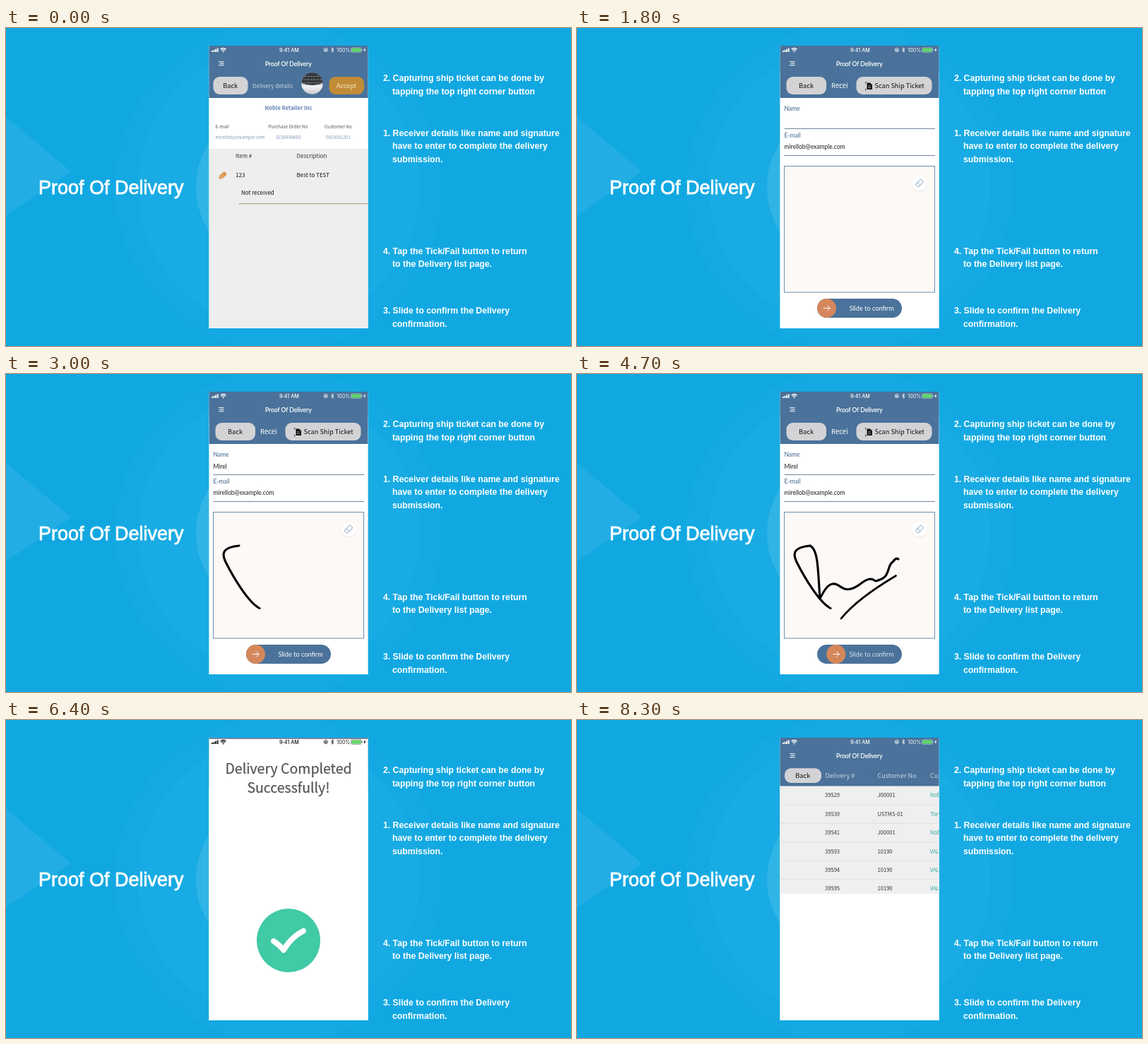
Write an HTML page that moves like this. It is 800 by 450 pixels and loops after 8.6 s.

```html
<!DOCTYPE html>
<html lang="en">
<head>
<meta charset="utf-8">
<title>Proof Of Delivery</title>
<style>
html, body { margin: 0; width: 100%; height: 100%; overflow: hidden; background: #11a8e2; }
svg { display: block; width: 100vw; height: 100vh; }
text { white-space: pre; }
.big { font: 27px "Liberation Sans", Arial, sans-serif; fill: #fff; stroke: #fff; stroke-width: .8; }
.note { font: bold 12.25px "Liberation Sans", Arial, sans-serif; fill: #fff; }
.s { font-family: "Noto Sans CJK JP", "Noto Sans CJK SC", "Noto Sans CJK", "Noto Sans", sans-serif; font-size: 8px; fill: #333; }
.l { font-family: Lato, sans-serif; font-size: 8.5px; fill: #1c1c1c; }
.btn { font-size: 9.2px; font-weight: 500; fill: #111; }
.lab { font-size: 6.4px; fill: #555; }
.val { font-size: 6.3px; fill: #7f93b8; }
.row { font-size: 7.6px; }
.sub { font-size: 9.1px; fill: #c9d5e2; }
.name { fill: #2fa9a4; }
.blue { fill: #4a729a; }
.title { fill: #fff; font-weight: 500; stroke: #fff; stroke-width: .15; text-anchor: middle; }
.mid { text-anchor: middle; }
.line { fill: none; stroke: #73859a; stroke-width: 1; }
.ink { fill: none; stroke: #000; stroke-linecap: round; stroke-linejoin: round; }
.done { font-size: 19.5px; font-weight: 500; fill: #555; stroke: #555; stroke-width: .25; text-anchor: middle; }
</style>
</head>
<body>
<svg viewBox="0 0 800 450" preserveAspectRatio="none">
  <defs>
    <clipPath id="screen"><rect x="287.5" y="25" width="225" height="400"/></clipPath>
    <clipPath id="ball"><circle cx="433.5" cy="78.5" r="15.2"/></clipPath>
    <linearGradient id="silver" x2="0" y2="1">
      <stop offset=".3" stop-color="#b9bcc0"/><stop offset=".65" stop-color="#f1f2f3"/><stop offset="1" stop-color="#c5c9ce"/>
    </linearGradient>
  </defs>

  <rect width="800" height="450" fill="#11a8e2"/>
  <g fill="#fff">
    <path d="M0 126 92 203 0 265Z" opacity=".07"/>
    <circle cx="386" cy="225" r="232" opacity=".012"/>
    <circle cx="386" cy="225" r="200" opacity=".018"/>
    <circle cx="386" cy="225" r="117" opacity=".1"/>
  </g>
  <text class="big" x="46" y="234.5">Proof Of Delivery</text>
  <g id="notes"></g>

  <g clip-path="url(#screen)">
    <rect x="287" y="25" width="226" height="400" fill="#fff"/>

    <g id="details">
      <rect x="287" y="99" width="226" height="72" fill="#fff"/>
      <rect x="287" y="171" width="226" height="254" fill="#eee"/>
      <rect class="blue" x="287" y="60" width="226" height="39"/>
      <rect x="293.5" y="69" width="49" height="25" rx="9" fill="#d3d3d6"/>
      <text class="s btn mid" x="317.7" y="85">Back</text>
      <text class="s" x="349" y="84.7" style="fill:#c9d5e2">Delivery details</text>
      <g clip-path="url(#ball)">
        <rect x="418" y="63" width="31" height="31" fill="url(#silver)"/>
        <path d="M418 63h31v15q-15 6-31 0Z" fill="#34363a"/>
        <path d="M418 68.5h31M418 73h31M418 77.5h31" stroke="#8b9097" stroke-width="1" stroke-dasharray="3 1.4"/>
      </g>
      <rect id="accept" x="457.5" y="69" width="49.5" height="25" rx="9" fill="#c28b37"/>
      <text class="s btn mid" x="482" y="85" style="fill:#f6e5c6">Accept</text>
      <text class="s mid" x="400" y="116" style="font-size:7.7px;font-weight:700;fill:#6486b8">Noble Retailer Inc</text>
      <g class="s">
        <text class="lab" x="296.5" y="141.7">E-mail</text>
        <text class="lab" x="371.5" y="141.7">Purchase Order No</text>
        <text class="lab" x="451" y="141.7">Customer No</text>
        <text class="val" x="296.5" y="157">mirellob@example.com</text>
        <text class="val" x="382" y="157">SCSAFAWSG</text>
        <text class="val" x="453" y="157">0010001201</text>
      </g>
      <g id="items" class="s">
        <text x="325" y="183.8">Item #</text>
        <text x="411.5" y="183.8">Description</text>
        <text x="325" y="210.8" fill="#111">123</text>
        <text x="411.5" y="210.8" fill="#111">Best to TEST</text>
        <text x="333" y="235.5" fill="#111">Not received</text>
        <path d="M330 248.7H513" stroke="#8f6f52" stroke-width="1" stroke-dasharray="1.5 .7"/>
        <g transform="translate(306.5 209) rotate(-42)" fill="#f4c48d" stroke="#cf7a2b" stroke-width="1">
          <path d="M-6 0-3-2.3H5.5V2.3H-3Z"/><path d="M-3 0H5M3-2.3V2.3" fill="none"/>
        </g>
      </g>
      <g id="received">
        <text class="s" x="378" y="183.8">Delivered</text>
        <path class="line" d="M351 207.5H513"/>
      </g>
    </g>

    <g id="form">
      <rect x="287.5" y="99" width="225" height="326" fill="#fff"/>
      <rect class="blue" x="287.5" y="60" width="225" height="39"/>
      <rect x="296.5" y="69" width="56.5" height="25" rx="9" fill="#d3d3d6"/>
      <text class="s btn mid" x="324.5" y="85">Back</text>
      <text class="s" x="360" y="85" style="font-size:9.5px;fill:#fff">Recei</text>
      <rect x="395.5" y="69" width="107" height="25" rx="9" fill="#d3d3d6"/>
      <path d="M410.5 77.5h4.5l3 3v6.5h-7.5Z" fill="#111"/>
      <path d="M412 82h4M412 84.5h4" stroke="#d3d3d6" stroke-width=".7"/>
      <path d="M408.5 79v-2.5h1.5M408.5 85.5v2.5h1.5" fill="none" stroke="#111" stroke-width=".6"/>
      <text class="s btn" x="421.5" y="85.2">Scan Ship Ticket</text>
      <text class="l" x="293.5" y="117" style="fill:#41658c">Name</text>
      <text class="l" id="typed" x="293.5" y="133.5"></text>
      <path class="line" d="M293.5 142.5H507M293.5 180.5H507"/>
      <text class="l" x="293.5" y="154.5" style="fill:#41658c">E-mail</text>
      <text class="l" x="293.5" y="171">mirellob@example.com</text>
      <rect x="293.5" y="195.5" width="213" height="178.5" fill="#fdf9f7" stroke="#6d8fae"/>
      <circle cx="485" cy="220.3" r="11.2" fill="#e9e6e5"/>
      <circle cx="485" cy="219.7" r="10.8" fill="#fff"/>
      <g transform="translate(485 219.5) rotate(-45)" fill="none" stroke="#6d93b5" stroke-width=".9">
        <rect x="-5.5" y="-2.8" width="11" height="5.6" rx=".8"/><path d="M-1.5-2.8V2.8"/>
      </g>
      <g class="ink" stroke-width="3.1">
        <path id="ink1" pathLength="1" d="M359 331.5C343 323 322 288 311 266C304 252 309 245 330 243"/>
        <path id="ink2" pathLength="1" d="M330 243C342 249 341 278 344 318C350 306 355 298 362 297C371 295 375 308 388 304C400 301 405 291 415 290C424 290 418 296 429 291C444 286 439 270 447 266Q452 259 455 262"/>
        <path id="ink3" pathLength="1" stroke-width="2.7" d="M374 346C391 325 417 306 451.5 285.5"/>
      </g>
      <rect class="blue" x="340" y="383" width="120" height="27" rx="13.5"/>
      <text class="l" id="hint" x="385.5" y="400" style="font-size:9.2px;fill:#fff">Slide to confirm</text>
      <g id="thumb">
        <circle cx="353.5" cy="396.5" r="13.5" fill="#d5875b"/>
        <path d="M349 396.5h9M354.3 392.7l3.8 3.8-3.8 3.8" fill="none" stroke="#fff" stroke-width="1"/>
      </g>
    </g>

    <g id="list">
      <rect x="287" y="93" width="226" height="332" fill="#fff"/>
      <rect x="287" y="93.5" width="226" height="152.5" fill="#efefef"/>
      <rect class="blue" x="287" y="60" width="226" height="33.5"/>
      <rect x="294" y="68.3" width="52" height="20.7" rx="9" fill="#d3d3d6"/>
      <text class="s btn mid" x="319.8" y="82">Back</text>
      <text class="s sub" x="351.5" y="82">Delivery #</text>
      <text class="s sub" x="425.5" y="82">Customer No</text>
      <text class="s sub" x="500" y="82">Customer</text>
      <g id="rows"></g>
    </g>

    <rect class="blue" x="287" y="25" width="226" height="36"/>
    <path d="M301 47.8h7.5M302.5 50.3h6M301 52.8h7.5" stroke="#fff" stroke-width="1.1"/>
    <text class="l title" id="title1" x="399.8" y="53.7">Proof Of Delivery</text>
    <text class="l title" id="title2" x="399.8" y="53.7">Proof Of Delivery</text>

    <rect id="dim" x="287" y="25" width="226" height="400" fill="#646464"/>
    <g id="spinner" stroke="#fff" stroke-width="1.1" stroke-linecap="round"></g>

    <g id="success">
      <rect x="287" y="25" width="226" height="400" fill="#fff"/>
      <path id="edge" d="M287 26H513" stroke="#71869f" stroke-width="2"/>
      <text class="s done" x="400" y="75.7">Delivery Completed</text>
      <text class="s done" x="400" y="103">Successfully!</text>
      <g id="badge">
        <circle r="45" fill="#40caa5"/>
        <path id="tick" pathLength="1" d="M-21 1Q-12 7-7 13.5Q4-5 21-13.5" fill="none" stroke="#fff" stroke-width="8" stroke-linecap="round" stroke-linejoin="round"/>
      </g>
    </g>

    <g id="status" fill="currentColor">
      <path d="M291 32h1.8v2h-1.8ZM293.6 31h1.8v3h-1.8ZM296.2 29.8h1.8v4.2h-1.8ZM298.8 28.5h1.8v5.5h-1.8Z"/>
      <path d="M303.6 30.3q4-3.6 8 0M305.2 32q2.4-2.2 4.8 0" fill="none" stroke="currentColor" stroke-width="1.2"/>
      <circle cx="307.6" cy="33.5" r=".9"/>
      <text x="401" y="33.6" text-anchor="middle" style="font:500 7.2px Inter,sans-serif">9:41 AM</text>
      <g fill="none" stroke="currentColor" stroke-width=".8">
        <circle cx="452.8" cy="31" r="2.6"/>
        <path d="M460.5 29.2l3.4 3.4-1.7 1.6v-6.4l1.7 1.6-3.4 3.4"/>
        <rect x="488.6" y="28" width="14.4" height="6.2" rx="1.2" stroke-width=".5"/>
      </g>
      <rect x="451.6" y="30.4" width="2.4" height="1.8"/>
      <text x="468.3" y="33.6" style="font:7.1px Inter,sans-serif">100%</text>
      <rect x="489.3" y="28.7" width="13" height="4.8" rx=".7" fill="#5fd964"/>
      <path d="M503.5 30h.8v2h-.8ZM508.6 28l-2.6 3.5h1.6l-.6 2.6 2.6-3.6h-1.6Z"/>
    </g>
  </g>
</svg>
<script>
const LOOP = 8600, STEP = 100, WIDTH = 225;
const $ = id => document.getElementById(id);
const ramp = (t, a, b) => Math.min(1, Math.max(0, (t - a) / (b - a)));
const easeOut = (x, p = 3) => 1 - Math.pow(1 - x, p);
const set = (id, attrs) => {
  for (const k in attrs) $(id).setAttribute(k, attrs[k]);
};
const show = (id, on) => set(id, { visibility: on ? "visible" : "hidden" });
const shift = (id, x, y = 0) => set(id, { transform: `translate(${x} ${y})` });
const draw = (id, p) => {
  show(id, p > 0);
  set(id, { "stroke-dasharray": p < 1 ? `${p} 2` : "none" });
};

const notes = [
  [534, 74.8, "2. Capturing ship ticket can be done by"],
  [547, 93.6, "tapping the top right corner button"],
  [534, 152.6, "1. Receiver details like name and signature"],
  [547, 171.4, "have to enter to complete the delivery"],
  [547, 190, "submission."],
  [534, 319.6, "4. Tap the Tick/Fail button to return"],
  [547, 338.4, "to the Delivery list page."],
  [534, 403.8, "3. Slide to confirm the Delivery"],
  [547, 422.6, "confirmation."]
];
$("notes").innerHTML = notes.map(([x, y, s]) => `<text class="note" x="${x}" y="${y}">${s}</text>`).join("");

const rows = [
  ["39529", "J00001", "Noble"], ["39539", "USTMS-01", "Torva"], ["39541", "J00001", "Noble"],
  ["39593", "10190", "VALOR"], ["39594", "10190", "VALOR"], ["39595", "10190", "VALOR"]
];
$("rows").innerHTML = rows.map(([id, no, who], i) => {
  const y = 109.3 + i * 26.4;
  return `<g class="s"><text class="row" x="351" y="${y}">${id}</text>
    <text class="row" x="425.5" y="${y}">${no}</text>
    <text class="row name" x="500" y="${y}">${who}</text></g>` +
    (i < 5 ? `<path d="M287 ${y + 10.5}H513" stroke="#dcdcdc" stroke-width=".8"/>` : "");
}).join("");

$("spinner").innerHTML = Array.from({ length: 12 }, (_, i) =>
  `<path d="M0-3V-5.5" transform="rotate(${i * 30})" opacity="${.25 + i * .065}"/>`).join("");

function render(t) {
  // Details page pushed aside by the form
  const push = easeOut(ramp(t, 740, 1290), 4.4);
  const isList = t >= 7700;
  show("details", t < 1300);
  show("items", t < 400);
  show("received", t >= 400 && t < 1300);
  set("accept", { opacity: t >= 100 && t < 300 ? .7 : 1 });
  shift("details", -.3 * WIDTH * push);
  show("form", push > 0 && !isList);
  shift("form", WIDTH * (1 - push));
  show("list", isList);
  set("title1", { opacity: push < 1 ? 1 - push * .65 : 0 });
  shift("title2", .7 * WIDTH * (1 - push));
  set("title2", { opacity: push });

  // Name, signature and slider
  $("typed").textContent = "Mirel".slice(0, Math.floor(ramp(t, 1900, 2500) * 5));
  draw("ink1", ramp(t, 2700, 3000));
  draw("ink2", ramp(t, 3000, 3700));
  draw("ink3", ramp(t, 3900, 4100));
  const slide = ramp(t, 4650, 5000);
  shift("thumb", 93 * slide);
  set("hint", { opacity: 1 - ramp(slide, 0, .7) });

  // Loader
  const load = t < 3000 ? ramp(t, 400, 600) * (1 - ramp(t, 920, 1300))
                        : ramp(t, 5000, 5200) * (1 - ramp(t, 6000, 6100));
  set("dim", { opacity: load * .5 });
  set("spinner", { opacity: load, transform: `translate(400 231) rotate(${Math.floor(t / 100) * 60})` });

  // Success sheet
  const drop = ramp(t, 7700, 8200);
  show("success", t >= 5700 && t < 8200);
  set("success", { opacity: ramp(t, 5700, 6000) });
  shift("success", 0, 400 * drop * drop * (3 - 2 * drop));
  const grow = easeOut(ramp(t, 5900, 6300));
  const bounce = 1 + .02 * Math.sin(Math.PI * 2 * ramp(t, 6400, 6800));
  set("badge", { transform: `translate(400 312) scale(${grow * bounce})` });
  draw("tick", ramp(t, 6000, 6400));
  set("edge", { opacity: 1 - ramp(t, 6400, 6800) });

  const dark = load > .4 || (t >= 5700 && drop < .15 && t < 8000);
  $("status").style.color = dark ? "#111" : "#fff";
}

function tick() {
  const t = performance.now() % LOOP;
  render(Math.floor(t / STEP) * STEP);
  requestAnimationFrame(tick);
}
tick();
</script>
</body>
</html>
```
